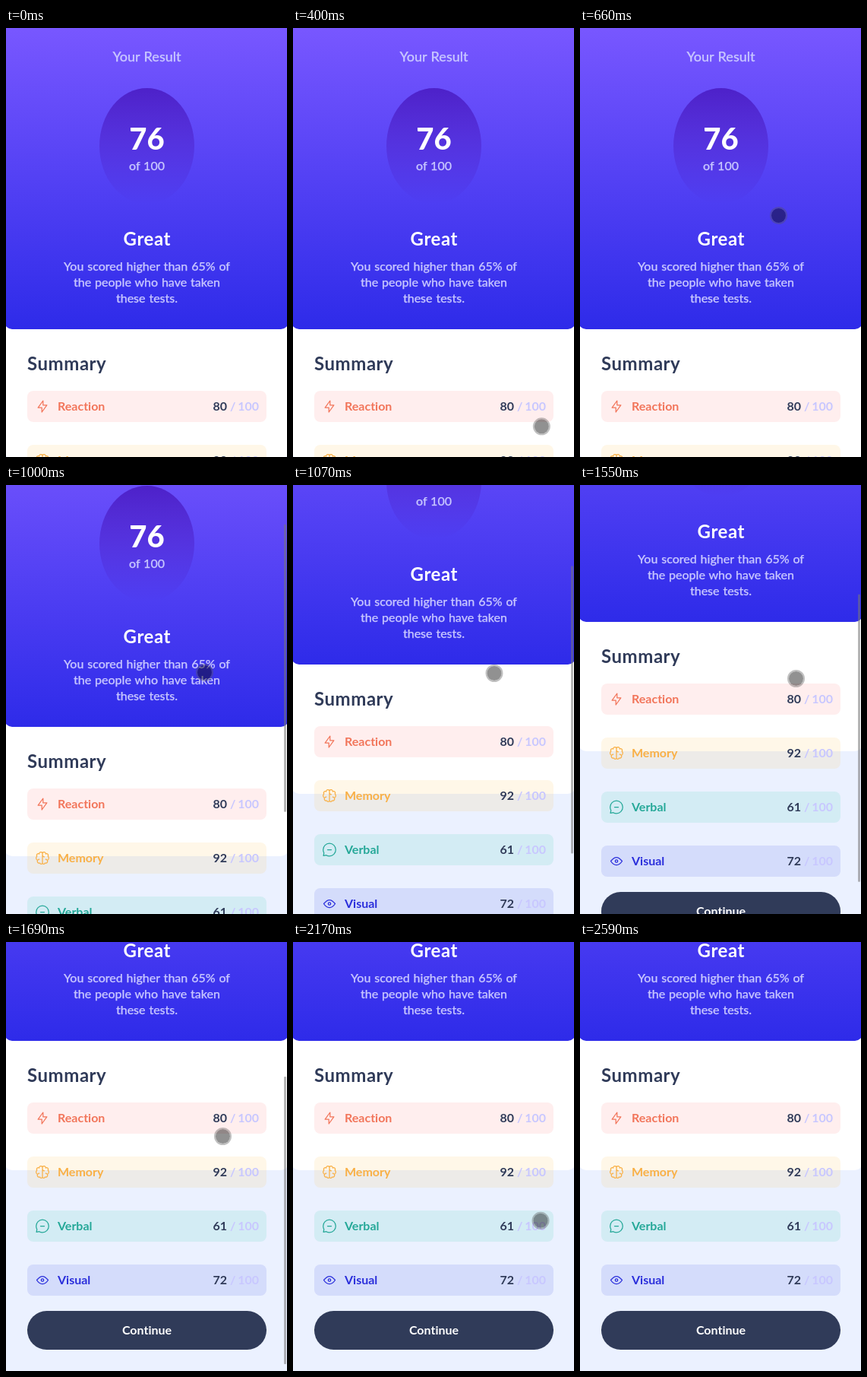
An HTML page that plays this animation: 370x564 px, repeating every 3350 ms.

```html
<!DOCTYPE html>
<html lang="en">
<head>
<meta charset="utf-8">
<title>Result summary</title>
<style>
  html, body { margin: 0; width: 100%; height: 100%; overflow: hidden; background: #ebf1ff; }
  svg { display: block; width: 370px; height: 564px; }
  text { font: 700 16px Lato, "Open Sans", sans-serif; font-variant-ligatures: none; fill: #303b59; }
  .mid { text-anchor: middle; }
  .end { text-anchor: end; }
  .soft { font-weight: 500; fill: #c8c7ff; stroke: #c8c7ff; stroke-width: .25; word-spacing: .8px; }
  .pale { fill: #c8c7ff; }
  .white { fill: #fff; }
  .big { font-size: 24px; letter-spacing: .55px; }
  .icon { fill: none; stroke-width: 1.25; stroke-linecap: round; stroke-linejoin: round; }
</style>
</head>
<body>
<svg viewBox="0 0 370 564">
  <defs>
    <linearGradient id="heroFill" x2="0" y2="1">
      <stop stop-color="#7857ff"/><stop offset="1" stop-color="#2e2be9"/>
    </linearGradient>
    <linearGradient id="ovalFill" x2="0" y2="1">
      <stop stop-color="#4d21c9"/><stop offset="1" stop-color="#4d21c9" stop-opacity="0"/>
    </linearGradient>
  </defs>
  <g id="page">
    <rect x="-2" y="-20" width="374" height="586" rx="10" fill="#fff"/>
    <path d="M-2 0H372V386a10 10 0 0 1-10 10H8a10 10 0 0 1-10-10Z" fill="url(#heroFill)"/>
    <ellipse cx="185.5" cy="155" rx="62.5" ry="76" fill="url(#ovalFill)"/>
    <g class="mid">
      <text class="soft" x="185.5" y="44" style="font-size:18px">Your Result</text>
      <text class="white" x="185.5" y="159.5" style="font-size:40px;font-weight:800">76</text>
      <text class="soft" x="185.5" y="187">of 100</text>
      <text class="white big" x="185.8" y="286">Great</text>
      <text class="soft" x="185.5" y="319">You scored higher than 65% of</text>
      <text class="soft" x="185.5" y="340">the people who have taken</text>
      <text class="soft" x="185.5" y="361">these tests.</text>
    </g>
    <text class="big" x="28" y="450">Summary</text>
    <g id="rows"></g>
    <rect x="28" y="751" width="315" height="51" rx="25.5" fill="#303b59"/>
    <text class="white mid" x="185.5" y="782">Continue</text>
  </g>
  <rect id="bar" x="366" width="3" height="378" rx="1" fill="#777" fill-opacity=".55"/>
  <g id="cursor">
    <circle r="9.5" fill-opacity=".43"/>
    <circle r="10.5" fill="none" stroke="#555" stroke-width="2" stroke-opacity=".37"/>
  </g>
</svg>
<script>
const $ = id => document.getElementById(id);

// name, score, text colour, row tint, icon path on a 20px grid
const rows = [
  ['Reaction', 80, '#f2755a', '#ff5757',
    'M10.8 8.3V2.5L4.2 11.7h5v5.8l6.6-9.2Z'],
  ['Memory', 92, '#f9b046', '#ffb21e',
    'M5.8 11.7a2.5 2.5 0 1 0 .9 4.8M3.6 13a3.3 3.3 0 0 1-.8-5.5a2.1 2.1 0 0 1 3-2.9A2.1 2.1 0 1 1 10 3.75' +
    'v12.9a1.7 1.7 0 0 1-3.3 0M10 5.8a2.5 2.5 0 0 0 2.5 2.5M14.2 11.7a2.5 2.5 0 1 1-.9 4.8M16.4 13' +
    'a3.3 3.3 0 0 0 .8-5.5a2.1 2.1 0 0 0-3-2.9A2.1 2.1 0 1 0 10 3.75M10 16.7a1.7 1.7 0 0 0 3.3 0'],
  ['Verbal', 61, '#25a898', '#00bb8f',
    'M7.5 10h5M10 18.3A8.3 8.3 0 1 0 1.7 10c0 1.5.4 2.9 1.1 4.2l-.7 3.7 3.7-.7A8.3 8.3 0 0 0 10 18.3Z'],
  ['Visual', 72, '#2a2edb', '#1125d6',
    'M10 11.7a1.7 1.7 0 1 0 0-3.4a1.7 1.7 0 0 0 0 3.4ZM17.5 10c-1.6 2.5-4.4 5-7.5 5s-5.9-2.5-7.5-5C4.4 7.6 6.7 5 10 5s5.6 2.6 7.5 5Z']
];
$('rows').innerHTML = rows.map(([name, score, color, tint, icon], i) => `
  <g transform="translate(0 ${477 + 71 * i})">
    <rect x="28" width="315" height="41" rx="8" fill="${tint}" fill-opacity=".1"/>
    <path class="icon" transform="translate(38 10.5)" stroke="${color}" d="${icon}"/>
    <text x="68" y="26" style="fill:${color}">${name}</text>
    <text class="end" x="291" y="26">${score}</text>
    <text class="pale" x="295" y="26">/</text>
    <text class="pale end" x="333" y="26">100</text>
  </g>`).join('');

const LOOP = 3350;
// stretches of movement; the picture rests between them
const moves = [[330, 660], [930, 1210], [1480, 1960], [2030, 2590]];

const scrollKeys = [[896, 0], [1140, 200], [1482, 200], [1690, 266]];
const barKeys = [[860, 0], [1000, 1], [1760, 1], [1960, 0]];
const cursorKeys = [
  [330, 335, 556], [660, 261.5, 246.5], [1000, 261.5, 246.5], [1140, 268.5, 248.5],
  [1210, 281, 253], [1480, 282.5, 254], [1550, 284.5, 254.5], [1690, 285.5, 255.5],
  [1830, 287, 257], [1960, 311, 276], [2520, 358.5, 561.5]
];

// advance in steps of about 69 ms
function snap(t) {
  let s = 0;
  for (const [a, b] of moves) {
    if (t < a) break;
    const step = (b - a) / Math.round((b - a) / 69);
    s = Math.min(b, a + Math.floor((t - a) / step + 1e-6) * step);
  }
  return s;
}

// eased value between keys [time, value, ...]
function at(keys, t, k = 1) {
  const i = keys.findIndex(key => key[0] > t);
  if (i < 0) return keys[keys.length - 1][k];
  if (!i) return keys[0][k];
  const a = keys[i - 1], b = keys[i], u = (t - a[0]) / (b[0] - a[0]);
  return a[k] + (b[k] - a[k]) * u * u * (3 - 2 * u);
}

function draw(now) {
  const t = snap(now % LOOP), y = Math.round(at(scrollKeys, t));
  $('page').setAttribute('transform', `translate(0 ${-y})`);
  $('bar').setAttribute('y', y * .665);
  $('bar').setAttribute('opacity', at(barKeys, t));
  $('cursor').setAttribute('transform', `translate(${at(cursorKeys, t)} ${at(cursorKeys, t, 2)})`);
  $('cursor').setAttribute('opacity', t >= 330 && t < 2589 ? 1 : 0);
}

let start;
function tick(now) {
  start ??= now;
  draw(now - start);
  requestAnimationFrame(tick);
}
draw(0);
requestAnimationFrame(tick);
</script>
</body>
</html>
```
